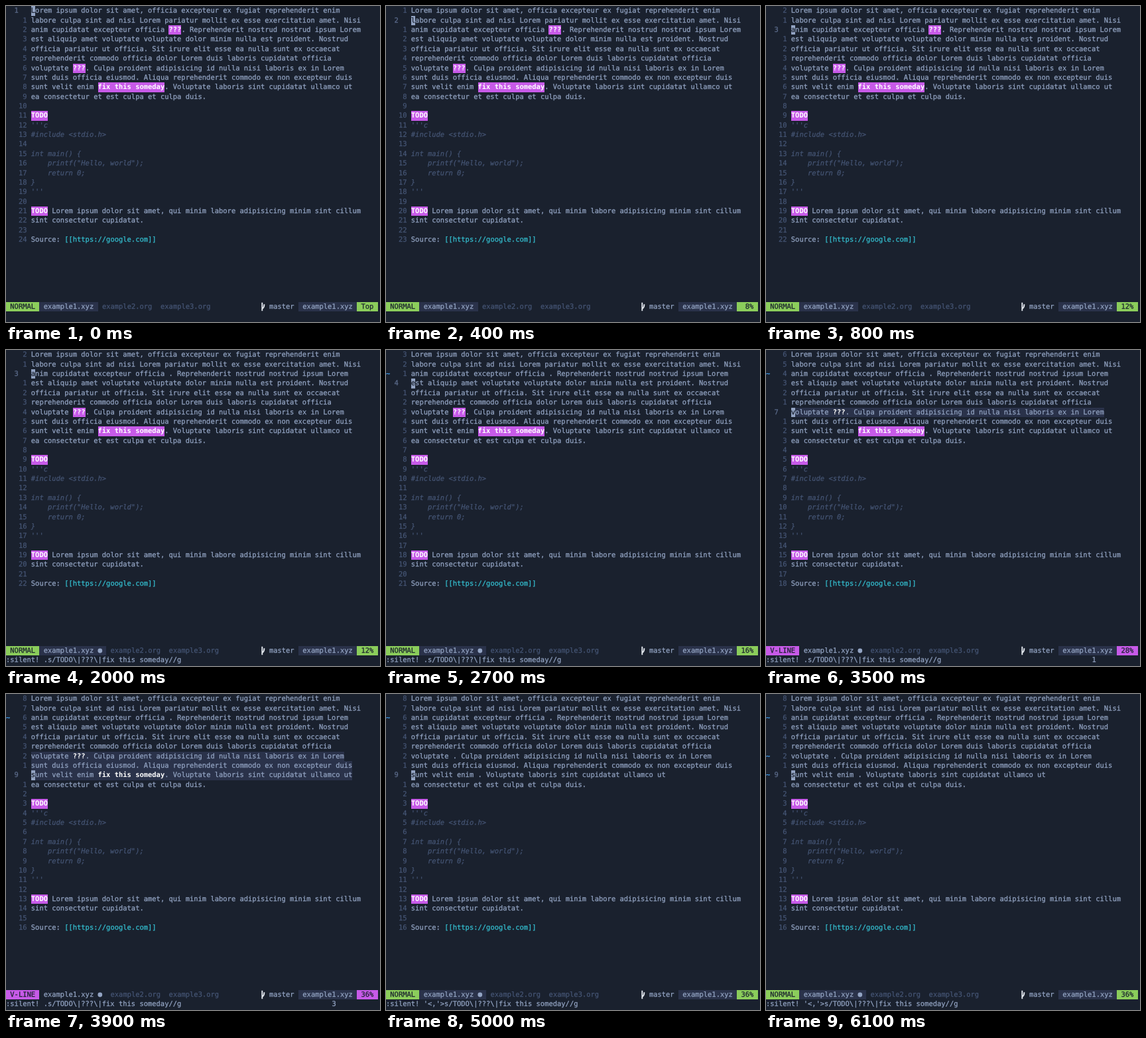
Write an HTML page that moves like this. It is 564 px wide and 476 px high and loops after 6.3 s.

```html
<!DOCTYPE html>
<html lang="en">
<head>
<meta charset="utf-8">
<title>Editor session</title>
<style>
html, body { margin: 0; width: 100%; height: 100%; overflow: hidden; background: #1a212e; }
#screen {
  position: relative; width: 564px; height: 476px; overflow: hidden;
  font: 10.465px/14.37px "DejaVu Sans Mono", monospace;
  text-rendering: geometricPrecision; font-variant-ligatures: none;
  -webkit-text-stroke: 0.25px;
  color: #93a4c3; white-space: pre;
}
#screen div { position: absolute; height: 14.37px; }
#screen b, #screen .cursor { display: inline-block; height: 14.37px; vertical-align: top; }
#screen b { background: #c75ae8; color: #fff; -webkit-text-stroke: 0; }
#screen .sel { background: #2a324a; }
#screen .sel b { background: none; }
#screen .cursor { background: #93a4c3; color: #1a212e; }
#screen .dim { color: #455574; }
#screen .current { color: #5c6c8c; }
#screen .code { color: #455574; font-style: italic; }
#screen .link { color: #34bfd0; }
#screen .sign { color: #41a7fc; }
#screen .box { background: #2a324a; }
#screen .normal { background: #8bcd5b; color: #1a212e; }
#screen .visual { background: #c75ae8; color: #1a212e; }
svg { position: absolute; left: 0; top: 0; }
.branch { fill: none; stroke: #e6ebf2; stroke-width: 1.9; }
.dot { fill: #93a4c3; }
</style>
</head>
<body>
<div id="screen"></div>
<script>
const CELL = 6.3, ROW = 14.37, TOP = 0.3, LOOP = 6300;
const STATUS = 31, COMMAND = 32;

const text = `Lorem ipsum dolor sit amet, officia excepteur ex fugiat reprehenderit enim
labore culpa sint ad nisi Lorem pariatur mollit ex esse exercitation amet. Nisi
anim cupidatat excepteur officia ???. Reprehenderit nostrud nostrud ipsum Lorem
est aliquip amet voluptate voluptate dolor minim nulla est proident. Nostrud
officia pariatur ut officia. Sit irure elit esse ea nulla sunt ex occaecat
reprehenderit commodo officia dolor Lorem duis laboris cupidatat officia
voluptate ???. Culpa proident adipisicing id nulla nisi laboris ex in Lorem
sunt duis officia eiusmod. Aliqua reprehenderit commodo ex non excepteur duis
sunt velit enim fix this someday. Voluptate laboris sint cupidatat ullamco ut
ea consectetur et est culpa et culpa duis.

TODO
'''c
#include <stdio.h>

int main() {
    printf("Hello, world");
    return 0;
}
'''

TODO Lorem ipsum dolor sit amet, qui minim labore adipisicing minim sint cillum
sint consectetur cupidatat.

Source: [[https://google.com]]`.split("\n");

const marks = /TODO|\?\?\?|fix this someday/g;
const pattern = "s/TODO\\|???\\|fix this someday//g";

// Each step changes only the listed parts of the editor state.
const steps = [
  { at: 0, line: 1, cleaned: [], signs: [], from: 0, command: "" },
  { at: 400, line: 2 },
  { at: 800, line: 3 },
  { at: 2000, cleaned: [3], command: ":silent! ." + pattern },
  { at: 2100, signs: [3] },
  { at: 2700, line: 4 },
  { at: 2900, line: 5 },
  { at: 3000, line: 6 },
  { at: 3200, line: 7 },
  { at: 3500, from: 7 },
  { at: 3600, line: 8 },
  { at: 3800, line: 9 },
  { at: 5000, from: 0, cleaned: [3, 7, 9], command: ":silent! '<,'>" + pattern },
  { at: 5100, signs: [3, 7, 9] }
];

const screen = document.getElementById("screen");
const escape = s => s.replace(/&/g, "&amp;").replace(/</g, "&lt;");
const put = (col, row, html, cls = "") =>
  `<div class="${cls}" style="left:${(col * CELL).toFixed(2)}px;top:${(TOP + row * ROW).toFixed(2)}px">${html}</div>`;

const decorate = s => escape(s)
  .replace(marks, "<b>$&</b>")
  .replace(/\[\[.*\]\]/, '<span class="link">$&</span>');

function bufferLine(s, i) {
  const n = i + 1, here = n === s.line;
  let line = text[i];
  if (s.cleaned.includes(n)) line = line.replace(marks, "");
  const body = here
    ? `<span class="cursor">${line[0]}</span>` + decorate(line.slice(1))
    : decorate(line);
  const selected = s.from && n >= s.from && n <= s.line;
  const cls = selected ? "sel" : n >= 13 && n <= 20 ? "code" : "";
  const number = here
    ? put(2, i, n, "current")
    : put(2, i, String(Math.abs(n - s.line)).padStart(3), "dim");
  const sign = s.signs.includes(n) ? put(0, i, "~", "sign") : "";
  return sign + number + put(6, i, body, cls);
}

function statusLine(s) {
  const mode = s.from ? "visual" : "normal";
  const modified = s.cleaned.length > 0;
  const shift = modified ? 2 : 0;
  const place = s.line === 1 ? "Top" : (Math.floor(s.line * 100 / text.length) + "%").padStart(3);
  const dot = modified ? '<circle class="dot" cx="141.8" cy="453" r="3.4"/>' : "";
  return put(0, STATUS, s.from ? " V-LINE " : " NORMAL ", mode)
    + put(8, STATUS, " example1.xyz " + " ".repeat(shift), s.from ? "" : "box")
    + put(23 + shift, STATUS, "example2.org  example3.org", "dim")
    + put(63, STATUS, "master")
    + put(70, STATUS, " example1.xyz ", "box")
    + put(84, STATUS, ` ${place} `, mode)
    + `<svg width="564" height="476">${dot}<path class="branch" d="M386.3 446.8V459.3M386.3 455.8Q389.4 454.8 389.4 449.2"/></svg>`;
}

function draw(s) {
  screen.innerHTML = text.map((_, i) => bufferLine(s, i)).join("")
    + statusLine(s)
    + put(0, COMMAND, escape(s.command))
    + (s.from ? put(78, COMMAND, s.line - s.from + 1) : "");
}

let shown = 0;
function tick() {
  const t = performance.now() % LOOP;
  const past = steps.filter(s => s.at <= t);
  if (past.length !== shown) {
    shown = past.length;
    draw(Object.assign({}, ...past));
  }
  requestAnimationFrame(tick);
}
tick();
</script>
</body>
</html>
```
